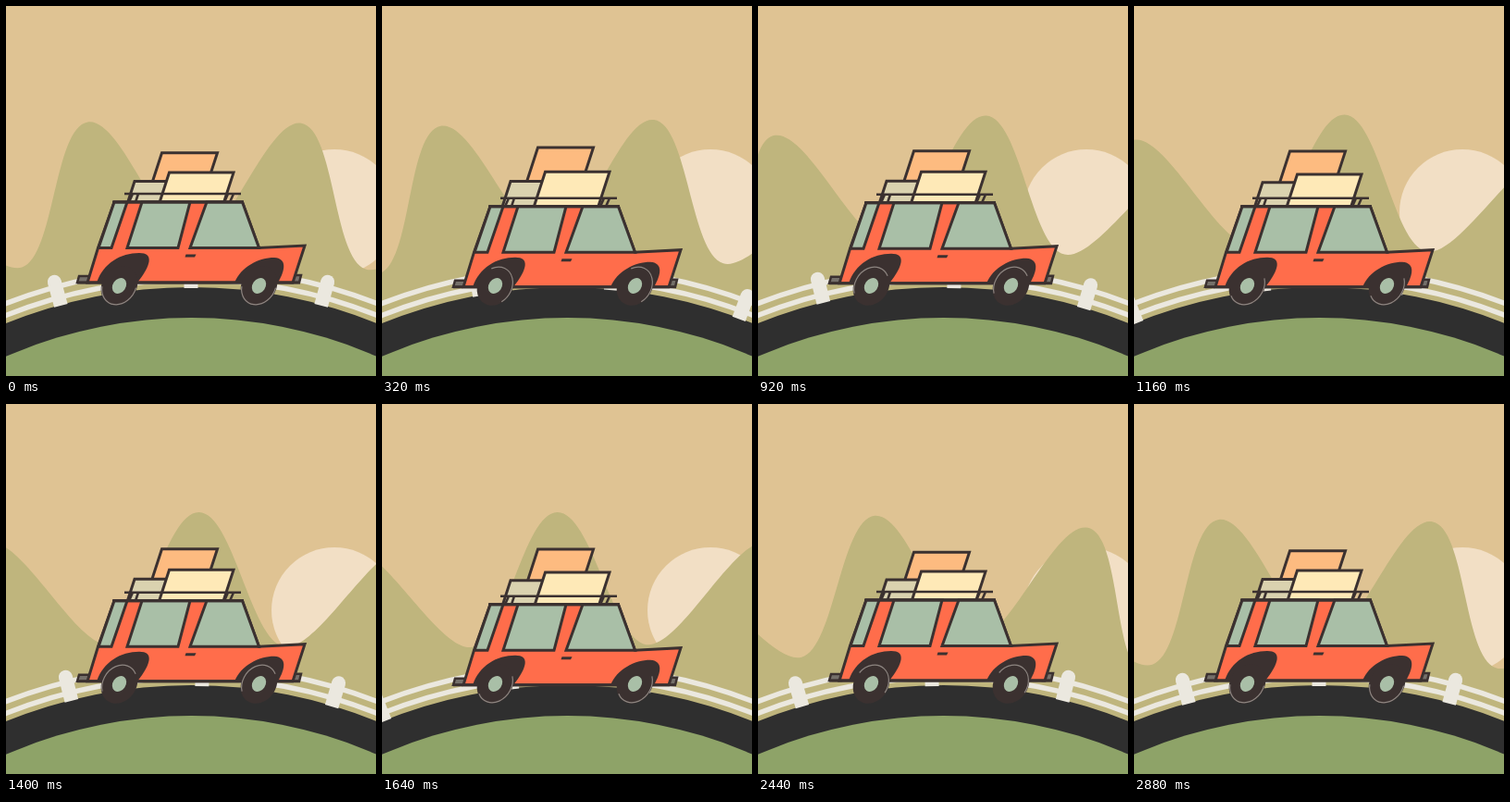
An HTML page with a canvas that plays this animation: 400x400 px, repeating every 2920 ms.

```html
<!DOCTYPE html>
<html>
<head>
<meta charset="utf-8">
<style>
html, body { margin: 0; width: 100%; height: 100%; overflow: hidden; background: #dfc393; }
canvas { display: block; width: 100vw; height: 100vh; }
</style>
</head>
<body>
<canvas id="stage" width="400" height="400"></canvas>
<script>
const ctx = document.getElementById('stage').getContext('2d');
const LOOP = 2920, STEP = 40, BEAT = 480, TAU = Math.PI * 2;
const HILL_GAP = 18, POST_GAP = 15.3;
const INK = '#3b3130', RED = '#ff6d4b', GLASS = '#a9bfa7', FENCE = '#ebe8df';
const rad = deg => deg * Math.PI / 180;

function disc(x, y, r, fill) {
  ctx.beginPath();
  ctx.arc(x, y, r, 0, TAU);
  ctx.fillStyle = fill;
  ctx.fill();
}

function shape(d, fill, line = 0) {
  const path = new Path2D(d);
  if (fill) {
    ctx.fillStyle = fill;
    ctx.fill(path);
  }
  if (line) {
    ctx.strokeStyle = INK;
    ctx.lineWidth = line;
    ctx.stroke(path);
  }
}

// Rolling hills: peaks and valleys evenly spaced on a large wheel
function hills(turn) {
  const peak = 738, valley = 601, handle = 37, cy = 855, half = HILL_GAP / 2;
  const at = (r, deg, along = 0) => {
    const a = rad(deg);
    return [200 + r * Math.sin(a) + along * Math.cos(a),
            cy - r * Math.cos(a) + along * Math.sin(a)];
  };
  ctx.beginPath();
  ctx.moveTo(200, cy);
  for (let i = -2; i <= 2; i++) {
    const a = turn + i * HILL_GAP, left = a - half, right = a + half;
    ctx.lineTo(...at(valley, left));
    ctx.bezierCurveTo(...at(valley, left, handle), ...at(peak, a, -handle), ...at(peak, a));
    ctx.bezierCurveTo(...at(peak, a, handle), ...at(valley, right, -handle), ...at(valley, right));
  }
  ctx.closePath();
  ctx.fillStyle = '#bfb57d';
  ctx.fill();
}

function ground(turn) {
  const cx = 200.5, cy = 838;
  ctx.strokeStyle = FENCE;
  ctx.lineWidth = 5.5;
  for (const r of [554, 542]) {
    ctx.beginPath();
    ctx.arc(cx, cy, r, Math.PI, TAU);
    ctx.stroke();
  }
  disc(cx, cy, 534, '#2f2f2f');
  ctx.fillStyle = FENCE;
  for (let i = -2; i <= 3; i++) {
    ctx.save();
    ctx.translate(200, cy);
    ctx.rotate(rad(turn + i * POST_GAP));
    ctx.beginPath();
    ctx.roundRect(-7.5, -567, 15, 34, [7.5, 7.5, 0, 0]);
    ctx.fill();
    ctx.restore();
  }
  disc(cx, cy, 501, '#8ea368');
}

function wheel(x, spin) {
  ctx.save();
  ctx.translate(x, 302.5);
  ctx.rotate(0.6);
  ctx.beginPath();
  ctx.ellipse(0, 0, 18.5, 22.5, 0, 0, TAU);
  ctx.fillStyle = INK;
  ctx.fill();
  ctx.beginPath();
  ctx.ellipse(0, 0, 17.5, 21.5, 0, spin - 1.5, spin + 1.5);
  ctx.strokeStyle = '#8d8580';
  ctx.lineWidth = 1.2;
  ctx.stroke();
  ctx.beginPath();
  ctx.ellipse(0, 0, 7, 9, 0, 0, TAU);
  ctx.fillStyle = GLASS;
  ctx.fill();
  ctx.restore();
}

// Parallelogram leaning right, with its foot hidden behind the roof
function box(x, y, w, foot, fill) {
  const lean = (foot - y) * 0.325;
  shape(`M${x} ${y}h${w}L${x + w - lean} ${foot}h${-w}Z`, fill, 3);
}

function car(phase) {
  const c = Math.cos(phase), s = Math.sin(phase);
  const bob = 2.7 - 2.8 * Math.cos(phase - TAU / 24);
  const roof = 212 + bob;

  box(168.5, 156.9 + 1.8 * c + 3.5 * s, 60, 196, '#fdbb80');
  box(139, 190 - 0.4 * c + 0.9 * s, 38, roof, '#dad2af');
  box(176.5, 180.6 - 0.5 * c + 1.9 * s, 69.5, roof, '#fee9b7');

  ctx.save();
  ctx.translate(0, bob);
  shape('M128 203H254M137 203l-4 9M143 203l-3 9M240 203l-4 9M246 203l-4 9', null, 2.6);
  shape('M79 292h11v7H77ZM310 291h9l-2 8h-9Z', '#75706a', 2.5);
  shape('M117 212H255.500L273.500 261.500L323 259L310 299H88L99.500 261.500Z', RED, 3);
  shape('M117 212h14L114 261.500H100Z', GLASS, 3);
  shape('M147 212h52L186 261.500H131Z', GLASS, 3);
  shape('M217 212h38.500L273.500 261.500H199Z', GLASS, 3);
  shape('M115 212H257M77 299H318', null, 3);
  shape('M193.500 271.500l1-3h11l-1.500 3Z', INK);
  shape('M98 299C105 278 124 267 144 267C160 267 157 280 142 299Z', INK);
  shape('M247 299C254 282 273 272 290 272C304 273 302 285 294 299Z', INK);
  ctx.restore();

  const spin = phase * 7 + 1.1;
  wheel(122.5, spin);
  wheel(273.5, spin);
}

function draw(now) {
  const t = Math.floor(now % LOOP / STEP) * STEP;
  const beat = t % BEAT / BEAT;
  ctx.fillStyle = '#dfc393';
  ctx.fillRect(0, 0, 400, 400);
  disc(355, 223, 68, '#f2dfc5');
  hills(9.3 - HILL_GAP * t / LOOP);
  ground(-POST_GAP * beat);
  car(beat * TAU);
}

const start = performance.now();
function tick() {
  draw(performance.now() - start);
  requestAnimationFrame(tick);
}
tick();
</script>
</body>
</html>
```
